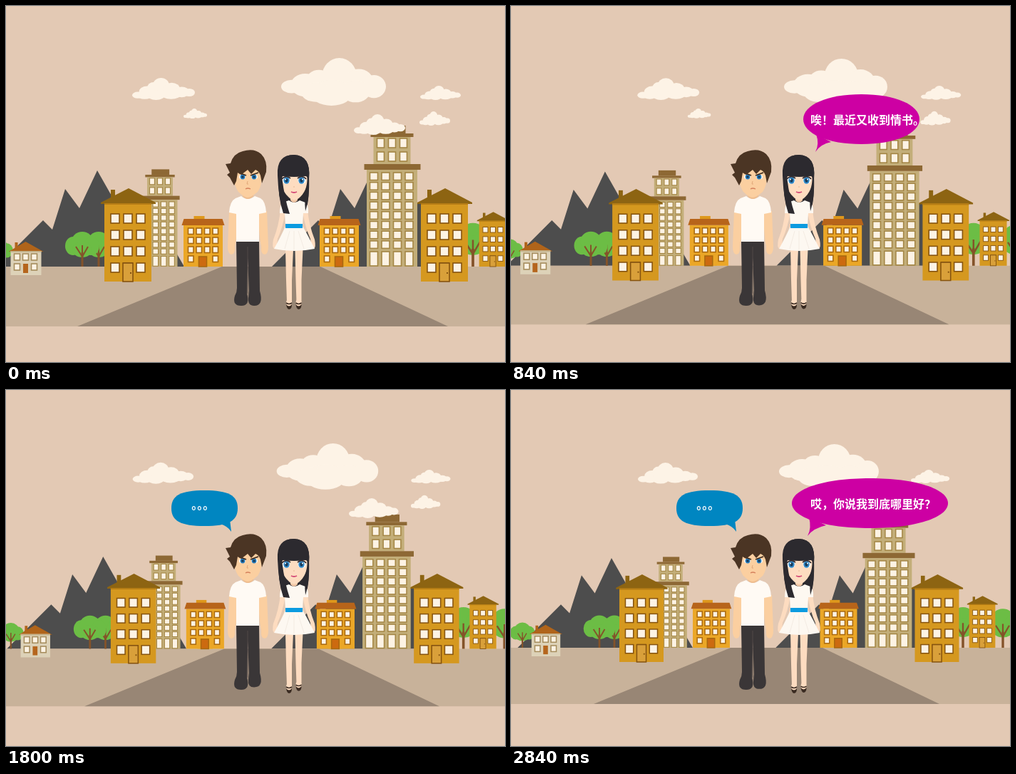
Animation of 700 by 500 pixels, one loop 2.88 s. Source, as an HTML page with a canvas:

```html
<!DOCTYPE html>
<html lang="zh-CN">
<head>
<meta charset="utf-8">
<title>Street talk</title>
<style>
  html, body { margin: 0; width: 100%; height: 100%; overflow: hidden; background: #e3c9b4; }
  canvas { display: block; }
</style>
</head>
<body>
<canvas id="stage" width="700" height="500"></canvas>
<script>
const ctx = document.getElementById('stage').getContext('2d');
const STEP = 40, FRAMES = 72, POP = 8, STRIDE = 20.57;
const CREAM = '#fdf3e4', SKIN = '#fbcfa0', PALE = '#fddcc0';
let frame = 0, progress = 0;

const mix = (a, b) => a + (b - a) * progress;

function box(color, x, y, w, h) {
  ctx.fillStyle = color;
  ctx.fillRect(x, y, w, h);
}
function shape(color, d) {
  ctx.fillStyle = color;
  ctx.fill(new Path2D(d));
}
function line(color, width, d) {
  ctx.strokeStyle = color;
  ctx.lineWidth = width;
  ctx.stroke(new Path2D(d));
}
function blob(color, x, y, rx, ry = rx) {
  ctx.fillStyle = color;
  ctx.beginPath();
  ctx.ellipse(x, y, rx, ry, 0, 0, 7);
  ctx.fill();
}
function scaled(x, y, sx, sy, draw) {
  ctx.save();
  ctx.translate(x, y);
  ctx.scale(sx, sy);
  draw();
  ctx.restore();
}
// Draws around a base point that drifts from (x0, y0) to (x1, y1) while shrinking.
function drift(draw, x0, y0, x1, y1, shrink, size = 1) {
  const s = size * mix(1, shrink);
  scaled(mix(x0, x1), mix(y0, y1), s, s, draw);
}
function bothSides(cx, draw) {
  draw();
  ctx.save();
  ctx.translate(2 * cx, 0);
  ctx.scale(-1, 1);
  draw();
  ctx.restore();
}

// Scenery, each part standing on its own origin
function pane(x, y, w, h, frameColor, fill = CREAM) {
  box(fill, x, y, w, h);
  ctx.strokeStyle = frameColor;
  ctx.lineWidth = 1.6;
  ctx.strokeRect(x, y, w, h);
}
function panes(xs, ys, w, h, frameColor) {
  for (const y of ys) for (const x of xs) pane(x, y, w, h, frameColor);
}
function mountain() {
  shape('#4d4d4d', 'M-65 0L0-65L13-52L31-109L51-82L76-135L106-82L146-90L198 0Z');
}
function tree() {
  for (const [x, y, rx, ry] of [[-13, -29, 11, 13], [0, -35, 15, 14], [13, -29, 11, 13], [0, -24, 14, 11]])
    blob('#6cbd45', x, y, rx, ry);
  line('#84532a', 3, 'M0 0V-20');
  line('#84532a', 2, 'M0-14L-9-28M0-14L8-28M0-18V-30');
}
function apartment() {
  box('#8d6412', -24, -129, 6, 16);
  shape('#8d6412', 'M-38-109L-38-111L1-131L39-111V-109Z');
  box('#d5981f', -33, -110, 66, 110);
  box('#b67d15', -33, -110, 66, 2);
  panes([-24, -6, 12], [-95, -72, -49, -26], 12, 13, '#85530f');
  pane(-7, -26, 14, 26, '#85530f', '#d9a03a');
  box('#85530f', 3, -13, 2, 2);
}
function cottage() {
  box('#b0641a', -15, -46, 4, 9);
  shape('#b0641a', 'M-24-33L0-47L25-33Z');
  box('#ddd2b8', -21, -34, 43, 34);
  box('#c4b38c', -21, -34, 43, 2);
  panes([-16, -4, 8], [-30, -16], 8, 9, '#a58c5c');
  box('#ddd2b8', -5, -17, 10, 15);
  box('#b5651d', -3.5, -16, 7, 13);
}
function block() {
  box('#de981c', -13, -71, 15, 5);
  box('#eba727', -27.5, -58, 55, 58);
  shape('#b7641a', 'M-30-58L-27-67H27L30-58Z');
  panes([-21, -9.5, 2, 13.5], [-54, -41, -28, -15], 7.5, 8.5, '#a9690f');
  box('#eba727', -11, -16, 22, 16);
  pane(-6, -14, 11, 14, '#a9690f', '#cc6a10');
}
function tower() {
  const wall = '#c3ae79', roof = '#8d6834', rim = '#a38544';
  box(roof, -17, -198, 36, 11);
  box(roof, -30, -187, 60, 5);
  box(wall, -26, -182, 52, 38);
  panes([-21, -5, 11], [-180, -161], 10, 13, rim);
  box(roof, -39, -144, 79, 8);
  box(wall, -35.5, -136, 71, 136);
  const columns = [-31, -14.5, 2, 18.5];
  panes(columns, [...Array(8).keys()].map(i => -132 + 13.7 * i), 11, 10.5, rim);
  panes(columns, [-21], 11, 20, rim);
}

const FULL_CLOUD = [[.1, .6, .1, .14], [.23, .57, .14, .24], [.36, .47, .12, .22], [.555, .38, .165, .38],
  [.74, .5, .14, .27], [.885, .6, .115, .24], [.48, .73, .2, .27], [.33, .72, .14, .2], [.71, .7, .14, .23]];
const FLAT_CLOUD = [[.09, .78, .09, .15], [.24, .63, .13, .26], [.34, .45, .1, .26], [.46, .34, .13, .34], [.63, .5, .13, .28],
  [.79, .64, .12, .24], [.91, .66, .09, .18], [.2, .78, .12, .18], [.38, .78, .14, .22], [.62, .74, .16, .22]];
function cloud(puffs, w, h, x0, y0, x1, y1, shrink) {
  drift(() => {
    for (const [x, y, rx, ry] of puffs) blob('#fdf3e6', x * w, y * h, rx * w, ry * h);
  }, x0, y0, x1, y1, shrink);
}

function scenery() {
  box('#e3c9b4', 0, 0, 700, 500);
  const horizon = mix(366, 362), edge = mix(450, 441);
  drift(mountain, 52, 366, 70, 362, .934);
  drift(mountain, 438, 366, 432, 362, .934);
  box('#c8b29a', 0, horizon, 700, edge - horizon);
  shape('#988675', `M${mix(303, 308)} ${horizon}H${mix(441, 437)}L${mix(620, 601)} ${edge}H${mix(100, 116)}Z`);

  cloud(FLAT_CLOUD, 88, 31, 177, 101, 178, 102, .955);
  cloud(FLAT_CLOUD, 33, 14, 249, 144, 245, 144, .95);
  cloud(FULL_CLOUD, 147, 67, 386, 73, 376, 76, .952);
  cloud(FLAT_CLOUD, 57, 20, 581, 112, 561, 112, .95);
  cloud(FLAT_CLOUD, 43, 20, 580, 148, 561, 147.5, .94);

  drift(tree, -9, 366, 16, 362, .93, .78);
  drift(tree, 130, 366, 145, 362, .93);
  drift(tree, 107, 366, 124, 362, .93);
  drift(tree, 655, 366, 634, 362, .93, 1.25);
  drift(tree, 715, 366, 690, 362, .93, 1.2);
  drift(cottage, 27.5, 378, 48.5, 374, .94);
  drift(tower, 216, 366, 224, 362, .934, .69);
  drift(block, 276.5, 366, 281, 362, .945);
  drift(block, 467.5, 366, 459.5, 362, .945);
  drift(tower, 541.5, 366, 529.5, 362, .925);
  drift(apartment, 171, 387, 183, 382, .939);
  drift(apartment, 683, 366, 661, 362, .95, .585);
  drift(apartment, 615, 387, 597.5, 382, .939);
  cloud(FLAT_CLOUD, 72, 29, 488, 152, 477, 152, .945);
}

// People
function leg(hip, lift, draw) {
  scaled(0, hip, 1, 1 - .042 * Math.max(0, lift), () => {
    ctx.translate(0, -hip);
    draw();
  });
}
function man(swing) {
  const dark = '#3a3637', hair = '#4b3524';
  leg(331, -swing, () => shape(dark, 'M323 330H340L338 404Q343 421 330 421Q317 421 321 407Q324 402 324 396Z'));
  leg(331, swing, () => shape(dark, 'M338 330H355L356 400Q362 421 348 421Q339 421 340 410L341 400Z'));
  line('#58504c', .8, 'M339 338V404');
  bothSides(339.5, () => shape(SKIN, 'M313 288L324 290Q325 318 321 338Q322 349 316 349Q311 348 311 338Z'));
  shape('#fffaf4', 'M330 267Q339 275 349 267L357 270Q364 274 365 290L355 292V331H323V292L313 290Q314 274 322 270Z');
  shape('#f0bd8d', 'M332 256H347V267Q339 275 332 267Z');
  shape(SKIN, 'M320 225H358Q361 250 353 261Q344 269 339 269Q334 269 326 261Q318 250 320 225Z');
  bothSides(340, () => {
    blob('#fff', 331.5, 240, 4.5, 3.2);
    blob('#2879b5', 332, 240, 3.4);
    blob('#17334d', 332, 240, 1.6);
    line('#38271c', 1.8, 'M326 234L337 238');
  });
  line('#e0a878', 1, 'M339 246L338 250H340');
  line('#d5805c', 1.3, 'M336 257Q339 255 343 257');
  shape(hair, 'M320 252L314 241L310 237L314 234L308 222L315 221Q319 207 332 204Q348 199 358 208Q367 217 365 233' +
    'L359 249L357 238Q355 232 350 230L344 236L339 230L330 237L325 234L323 246Z');
}
function woman(swing) {
  const hair = '#2c2a2f';
  const stride = () => {
    shape(PALE, 'M392 341H403L401 385L401 416H394L393 385Z');
    blob(PALE, 397, 417, 4, 6);
    line('#3a2b22', 1.6, 'M393 417Q397 420 401 417');
    shape('#3a2b22', 'M393 419Q394 426 397 426Q401 426 401 419Q397 424 393 419Z');
  };
  leg(343, -swing, stride);
  leg(343, swing, () => {
    ctx.translate(13.5, 0);
    stride();
  });
  shape(hair, 'M381 238Q379 209 404 209Q428 210 425 242Q426 270 421 286L389 289Q382 268 381 238Z');
  bothSides(404, () => shape(PALE, 'M385 286L392 289Q388 312 381 327Q380 341 376 341Q373 339 375 328Q383 308 385 286Z'));
  shape('#fdf8f1', 'M397 273Q404 279 412 273L420 276Q425 281 424 291L417 291L416 309Q424 323 433 341Q404 347 376 341' +
    'Q386 323 392 309L391 291L384 291Q384 280 388 276Z');
  line('#f0e8df', .8, 'M398 316L391 341M404 316V343M410 316L418 341');
  box('#0b9be0', 392, 306, 24, 6);
  shape('#f3c8a6', 'M399 266H409V273Q404 279 399 273Z');
  shape(PALE, 'M386 234H422Q425 256 413 268Q404 277 396 268Q383 256 386 234Z');
  bothSides(404, () => {
    blob('#fff', 393, 245, 5.5, 5);
    blob('#3188c6', 393.5, 245, 4.2, 4.8);
    blob('#173957', 393.5, 245, 2.1, 2.7);
    blob('#fff', 392, 243.5, 1.1);
    line('#28232a', 1.6, 'M387 243Q392 237 399 242');
  });
  line('#e9b996', 1, 'M403 254H405');
  line('#d54d78', 1.8, 'M400 261Q404 263 408 261');
  shape(hair, 'M382 242Q379 209 404 209Q428 210 425 243L421 239Q404 241 388 239L386 246Z');
  shape(hair, 'M382 236Q381 268 389 291L398 292Q391 272 387 240Z');
  shape(hair, 'M425 238Q426 270 420 288Q418 270 422 252Z');
}

// Speech bubbles grow out of the tip of their tail.
function bubble({ from, to = FRAMES, tip: [tx, ty], color, oval: [cx, cy, rx, ry], round, tail, text, at }) {
  if (frame < from || frame >= to) return;
  const s = Math.min(1, (frame - from) / POP), kx = rx * round, ky = ry * round;
  scaled(tx, ty, s, s, () => {
    ctx.translate(-tx, -ty);
    shape(color, `M${cx - rx} ${cy}C${cx - rx} ${cy - ky} ${cx - kx} ${cy - ry} ${cx} ${cy - ry}` +
      `S${cx + rx} ${cy - ky} ${cx + rx} ${cy}S${cx + kx} ${cy + ry} ${cx} ${cy + ry}S${cx - rx} ${cy + ky} ${cx - rx} ${cy}Z`);
    shape(color, tail);
    ctx.fillStyle = '#fff';
    ctx.font = 'bold 16px "Noto Sans CJK SC", "Noto Sans CJK", sans-serif';
    ctx.fillText(text, ...at);
  });
}
const BUBBLES = [
  { from: 9, to: 45, tip: [427, 205], color: '#cd00a3', oval: [491.5, 159, 81.5, 35], round: .58,
    tail: 'M428 180Q433 194 427 205Q434 194 449 191Z', text: '唉！最近又收到情书。', at: [420, 166] },
  { from: 27, tip: [316, 199], color: '#0086c1', oval: [278.5, 166, 46.5, 25], round: .72,
    tail: 'M300 188Q311 191 316 199L314 182Z', text: '。。。', at: [260.3, 167] },
  { from: 45, tip: [416, 205], color: '#cd00a3', oval: [503.5, 159, 109.5, 35], round: .58,
    tail: 'M418 179Q422 194 416 205Q424 194 442 190Z', text: '哎，你说我到底哪里好？', at: [420, 166] }
];

function draw(now) {
  frame = Math.floor(now / STEP) % FRAMES;
  progress = frame / (FRAMES - 1);
  const swing = Math.sin(2 * Math.PI * frame / STRIDE);
  scenery();
  man(swing);
  woman(swing);
  BUBBLES.forEach(bubble);
}
const start = performance.now();
function tick() {
  draw(performance.now() - start);
  requestAnimationFrame(tick);
}
tick();
</script>
</body>
</html>
```
